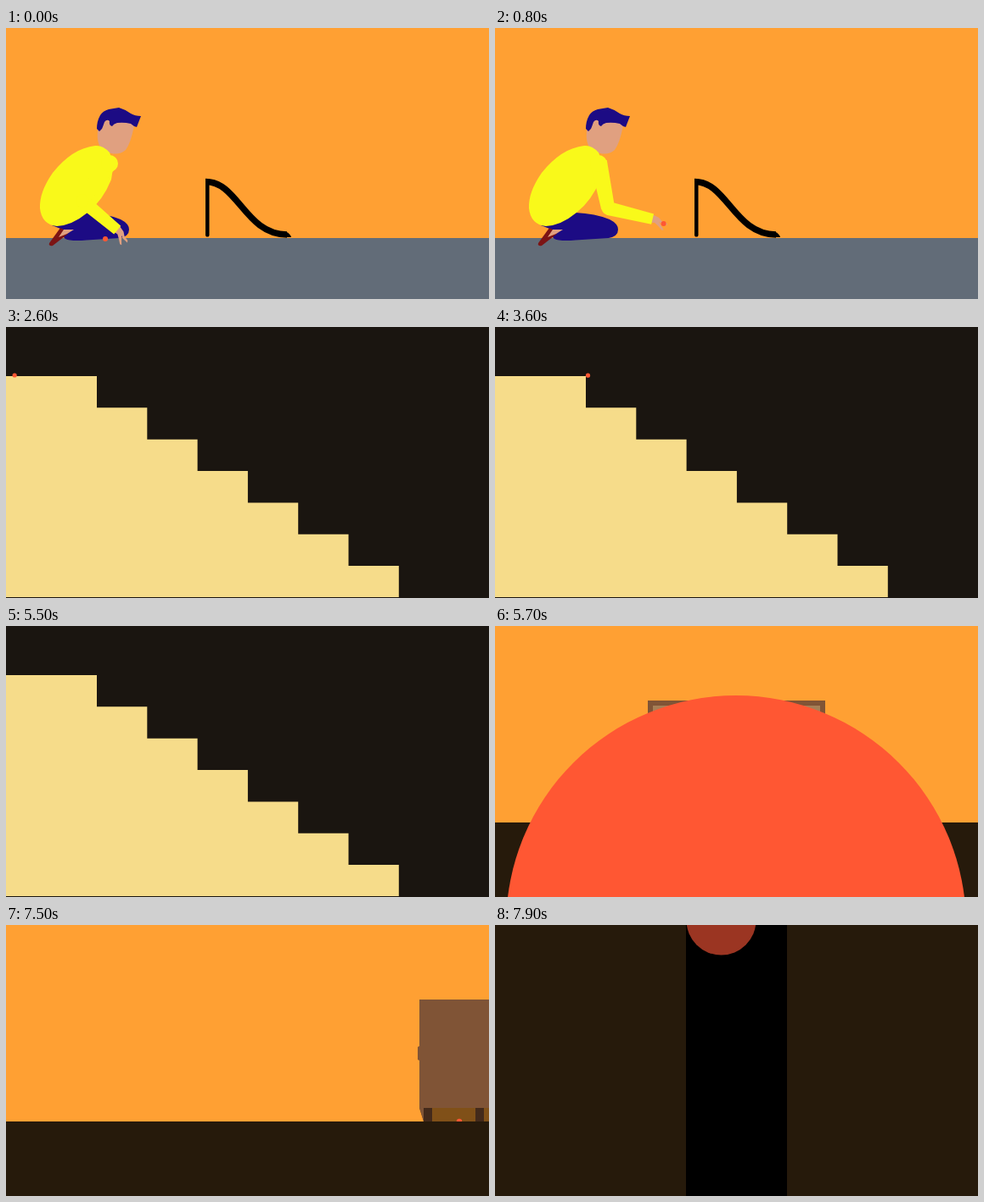
An HTML page that plays this animation: 569x320 px, repeating every 8 s.

```html
<!DOCTYPE html>
<html lang="en">
<head>
<meta charset="utf-8">
<title>Rolling ball</title>
<style>
  html, body { margin: 0; width: 100%; height: 100%; overflow: hidden; background: #ffa033; }
  svg { display: block; width: 100vw; height: 100vh; }
  .scene { display: none; }
  .scene.on { display: inline; }
  .ball { fill: #ff5733; }
  .sky { fill: #ffa033; }
  .floor { fill: #261a0b; }
  .skin { fill: #e0a080; }
  .navy { fill: #1c0b84; }
  .yellow { fill: #f9f91a; }
  .shoe { fill: #7c1414; }
  .wood { fill: #805436; }
  .leg { fill: #432a1b; }
  .shade { fill: #805018; }
</style>
</head>
<body>
<svg viewBox="0 0 569 320" preserveAspectRatio="none">
  <g class="scene" id="ramp">
    <rect class="sky" width="569" height="320"/>
    <rect y="248" width="569" height="72" fill="#626c78"/>
    <g id="boy">
      <path class="navy" d="M54 233 L72 240 Q64 245 70 249 Q76 252 95 250.500 L134 248 Q145 246 145 238 Q145 231 135 226 Q118 219 95 218 Z"/>
      <path class="shoe" d="M64 236 L70 239 L73 243 L55 257 Q50 258 51 254 Z"/>
      <path class="skin" d="M68 238 L80 238 L72 243 L62 247 Z"/>
      <path class="skin" d="M109 115 Q106 130 110 139 Q114 146 124 148 Q134 150 141 144 Q147 136 151 115 L139 108 L118 106 Z"/>
      <path class="navy" d="M110 122 L107 119 Q107 110 111 103 Q114 98 121 96 L133 94 Q140 96 147 101 Q152 104 159 104 L154 117 Q150 116 147 113 Q139 111 131 112 Q127 113 125 116 Q121 115 122 110 Q119 107 116 111 Q114 117 113 119 Z"/>
      <path class="yellow" d="M105 139 Q114 138 122 147 Q128 159 124 179 Q114 204 96 218 Q78 233 60 234 Q42 232 40 213 Q39 194 55 171 Q78 142 105 139 Z"/>
    </g>
    <path fill="none" stroke="#000" stroke-width="7.500" d="M235 181.500 C273 181 282 244 331 244"/>
    <path d="M235 178 h4.500 v67 l-1 1.500 h-2.500 l-1 -1.500 Z M329 241 L332 241.500 Q336 245 336 247 L329 247 Z"/>
    <g id="hand">
      <path class="skin" d="M-2 -5 L6 -4.500 L11 -2 L17 -2 L19 0 L12 1 L8 0 L13 4 L17 7 L15 8 L9 5 L4 3 L-2 5 Z"/>
    </g>
    <path class="yellow" id="arm"/>
    <circle class="yellow" id="shoulder" cx="122" cy="160" r="10"/>
    <circle class="yellow" id="elbow" r="7.500"/>
    <circle class="ball" id="rampBall" r="3"/>
  </g>

  <g class="scene" id="stairs">
    <rect width="569" height="320" fill="#1a1510"/>
    <path id="steps" fill="#f6dc8a"/>
    <circle class="ball" id="stairBall" r="2.600"/>
  </g>

  <g class="scene" id="front">
    <rect class="sky" width="569" height="320"/>
    <rect class="floor" y="232" width="569" height="88"/>
    <path class="shade" d="M180 216 H389 L384 232 H185 Z"/>
    <path class="leg" d="M185 216 h10 v16 h-10 Z M374 216 h10 v16 h-10 Z"/>
    <rect class="wood" x="180" y="88" width="209" height="128"/>
    <rect x="186" y="94" width="197" height="116" fill="#a67f56"/>
    <circle class="wood" cx="284.500" cy="151.500" r="8.500"/>
    <circle class="ball" id="bigBall" cx="284"/>
  </g>

  <g class="scene" id="side">
    <rect class="sky" width="569" height="320"/>
    <path class="shade" d="M487 216 H569 V232 H492 Z"/>
    <path class="wood" d="M485 144 l2 -1 V88 H569 V216 H487 V160 l-2 -1 Z M487 216 h5 v16 Z"/>
    <path class="leg" d="M492 216 h10 v16 h-10 Z M553 216 h10 v16 h-10 Z"/>
    <circle class="ball" id="sideBall" r="3.200"/>
    <rect class="floor" y="232" width="569" height="88"/>
  </g>

  <g class="scene" id="shaft">
    <rect class="floor" width="569" height="320"/>
    <rect x="225" width="119" height="320"/>
    <circle id="shaftBall" r="41" fill="#9b3522"/>
  </g>
</svg>
<script>
const LOOP = 8000, TICK = 100;
const $ = id => document.getElementById(id);
const clamp = v => Math.min(1, Math.max(0, v));
const mix = (a, b, k) => a + (b - a) * k;
const smooth = k => k * k * (3 - 2 * k);
const rad = deg => deg * Math.PI / 180;
const polar = ([x, y], deg, len) => [x + len * Math.cos(rad(deg)), y + len * Math.sin(rad(deg))];
const set = (id, attrs) => { for (const k in attrs) $(id).setAttribute(k, attrs[k]); };
const place = (id, [cx, cy]) => set(id, { cx, cy });

// Tapered limb outline between two joints
function limb(a, b, deg, wa, wb) {
  const pts = [polar(a, deg - 90, wa), polar(b, deg - 90, wb), polar(b, deg + 90, wb), polar(a, deg + 90, wa)];
  return "M" + pts.map(p => p.join(" ")).join("L") + "Z";
}

// Point resting on the slide at curve parameter s
function onSlide(s) {
  const xs = [236, 273, 282, 333], ys = [181, 181, 244, 244], q = 1 - s;
  const at = p => q ** 3 * p[0] + 3 * q * q * s * p[1] + 3 * q * s * s * p[2] + s ** 3 * p[3];
  const slope = p => q * q * (p[1] - p[0]) + 2 * q * s * (p[2] - p[1]) + s * s * (p[3] - p[2]);
  const dx = slope(xs), dy = slope(ys), len = Math.hypot(dx, dy);
  return [at(xs) + 6.5 * dy / len, at(ys) - 6.5 * dx / len];
}

function drawRamp(t) {
  const k = smooth(clamp((t - 300) / 1000));
  const shoulder = [122, 158];
  const upper = mix(125, 32, k), fore = mix(40, -12.5, k), palm = mix(52, -8, k);
  const elbow = polar(shoulder, upper, 56);
  const wrist = polar(elbow, fore, 54);
  const tip = polar(wrist, palm, 14);
  set("arm", { d: limb(shoulder, elbow, upper, 10, 8) + limb(elbow, wrist, fore, 8, 6.3) });
  place("elbow", elbow);
  set("hand", { transform: `translate(${wrist}) rotate(${palm})` });

  const s = 0.14 * (Math.max(0, t - 1400) / 300) ** 2;
  let ball = tip;
  if (t < 300) ball = [mix(117, tip[0], t / 300), 249];
  else if (t >= 1400) ball = s < 1 ? onSlide(s) : [333 + (t - 2200) * 0.38, 244.5];
  place("rampBall", ball);
}

const EDGE = 107, TOP = 58, RUN = 59.3, RISE = 37.35, GROUND = 319, HOP = 12;

function drawStairs(t) {
  const k = (t - 2700) / 900;
  const x = 16 + 93.5 * k + 41.5 * k * (k - 1) + 2.25 * k * (k - 1) * (k - 2);
  const p = (x - EDGE) / RUN, n = Math.floor(p), f = p - n;
  let y = TOP;
  if (n >= 0) {
    const tread = Math.min(GROUND, TOP + RISE * (n + 1));
    const drop = n > 6 ? HOP : RISE + (n ? HOP : 0);
    const lift = f < 0.55 ? drop * (1 - (f / 0.55) ** 2) : HOP * (1 - ((1 - f) / 0.45) ** 2);
    y = tread - lift;
  }
  place("stairBall", [x, y - 1]);
}

function drawFront(t) {
  const r = 271 * 0.645 ** ((t - 5700) / 100);
  set("bigBall", { r, cy: 226.2 + 0.468 * r });
}

function drawSide(t) {
  const left = Math.max(0, 7500 - t) / 1200;
  const fall = Math.max(0, t - 7400) / 100;
  place("sideBall", [534 - 160 * left ** 1.5, 229 + 3 * fall * fall]);
}

function drawShaft(t) {
  place("shaftBall", [266.5 + (t - 7900) * 0.05, -5.5 + (t - 7900) * 0.45]);
}

const scenes = [
  ["ramp", 0, drawRamp],
  ["stairs", 2400, drawStairs],
  ["front", 5600, drawFront],
  ["side", 6100, drawSide],
  ["shaft", 7700, drawShaft]
];

let outline = `M0 ${TOP}`;
for (let i = 0; i < 7; i++) outline += `H${EDGE + RUN * i}V${Math.min(GROUND, TOP + RISE * (i + 1))}`;
set("steps", { d: outline + "H0Z" });

const start = performance.now();
function frame() {
  // The motion is held at ten pictures a second
  const t = Math.floor(((performance.now() - start) % LOOP) / TICK) * TICK;
  const now = scenes.filter(s => s[1] <= t).pop();
  for (const [id] of scenes) $(id).classList.toggle("on", id === now[0]);
  now[2](t);
  requestAnimationFrame(frame);
}
frame();
</script>
</body>
</html>
```
